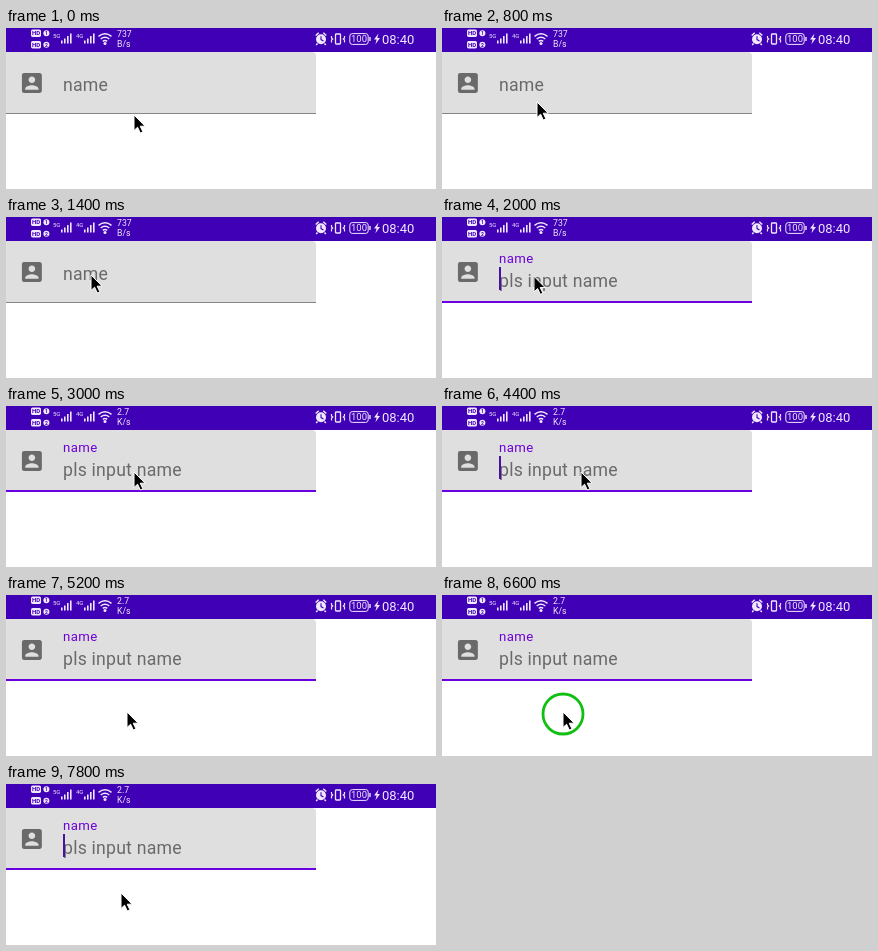
Write an HTML page that moves like this. It is 430 px wide and 161 px high and loops after 8 s.

```html
<!DOCTYPE html>
<html lang="en">
<head>
<meta charset="utf-8">
<title>Text field</title>
<style>
html, body { margin: 0; width: 100%; height: 100%; overflow: hidden; background: #fff; }
svg { display: block; width: 430px; height: 161px; font-family: Roboto, "Noto Sans", sans-serif; }
.bar { fill: #f0e8fc; }
.line { fill: none; stroke: #f0e8fc; }
</style>
</head>
<body>
<svg viewBox="0 0 430 161">
  <defs>
    <g id="sim">
      <path d="M9 12.5h1.6v3H9zM12 10.5h1.6v5H12zM15 8h1.6v7.5H15zM18 5.5h1.6v10H18z"/>
    </g>
    <g id="hd">
      <rect width="10" height="7.4" rx="1.6" class="bar"/>
      <text x="5" y="5.9" font-size="6" font-weight="700" text-anchor="middle" fill="#4000b6">HD</text>
      <circle cx="15.4" cy="3.7" r="3" class="bar"/>
    </g>
  </defs>

  <rect width="430" height="24" fill="#4000b6"/>
  <g font-size="5" font-weight="700" fill="#4000b6" text-anchor="middle">
    <use href="#hd" x="25" y="1.5"/><text x="40.4" y="7">1</text>
    <use href="#hd" x="25" y="13"/><text x="40.4" y="18.5">2</text>
  </g>
  <g class="bar">
    <use href="#sim" x="46"/><use href="#sim" x="69"/>
    <text x="47" y="10" font-size="6">5G</text><text x="70" y="10" font-size="6">4G</text>
    <circle cx="99" cy="15.4" r="1.5"/>
    <text id="speed" x="111" y="9" font-size="8.7"></text>
    <text id="unit" x="111" y="19" font-size="8.7"></text>
    <text x="353" y="14.4" font-size="9.5" text-anchor="middle">100</text>
    <path d="M372.5 5.5l-4.5 6h2.6l-1.2 4.8 4.6-6.3h-2.7z"/>
    <text x="376" y="15.7" font-size="13">08:40</text>
    <circle cx="315" cy="11.3" r="5"/>
  </g>
  <g class="line" stroke-width="1.5">
    <path d="M92.5 8.3q6.5-5 13 0M94.7 11q4.3-3.3 8.6 0M96.8 13.4q2.2-1.6 4.4 0"/>
    <path d="M309.7 7.5l3-2.7M320.3 7.5l-3-2.7M311.5 15.5l-1.3 1.5M318.5 15.5l1.3 1.5"/>
    <path d="M315 8.3v3.3l2.5 1.3" stroke="#4000b6" stroke-width="1.1"/>
    <rect x="329.5" y="6" width="5" height="10" rx=".8" stroke-width="1.3"/>
    <path d="M325.5 8v2l1.2 1-1.2 1v2.5M338.5 8v2l-1.2 1 1.2 1v2.5" stroke-width="1.2"/>
    <rect x="343.8" y="5.6" width="18.4" height="10.8" rx="2.5" stroke-width="1"/>
    <path d="M364 9v4" stroke-width="1.4"/>
  </g>

  <path d="M0 24h306a4 4 0 0 1 4 4v58H0z" fill="#dfdfdf"/>
  <path transform="translate(12.6 41.8) scale(1.107)" fill="#6a6a6a" d="M3 5v14a2 2 0 0 0 2 2h14c1.1 0 2-.9 2-2V5c0-1.1-.9-2-2-2H5a2 2 0 0 0-2 2zm12 4c0 1.66-1.34 3-3 3s-3-1.34-3-3 1.34-3 3-3 3 1.34 3 3zm-9 8c0-2 4-3.1 6-3.1s6 1.1 6 3.1v1H6z"/>
  <rect id="under" width="310"/>
  <text id="label" x="57" letter-spacing=".2">name</text>
  <text id="hint" x="57" y="70" font-size="17.7" letter-spacing=".2" fill="#6a6a6a">pls input name</text>
  <rect id="caret" x="57" y="50" width="2" height="23" fill="#4a0fa8"/>

  <circle id="ring" r="20" fill="none" stroke="#10c010" stroke-width="2.8"/>
  <path id="mouse" d="M0 0v15.5l3.6-3.3 2.7 5.8 2.6-1.2-2.7-5.6h4.9z" fill="#000" stroke="#fff" stroke-width="1"/>
</svg>
<script>
const $ = id => document.getElementById(id);
const LOOP = 8000, STEP = 200, FOCUS = 1700;

// time, x, y of the pointer tip
const path = [
  [0, 128, 87], [200, 128, 101], [400, 123, 107], [600, 111, 95], [800, 95, 74],
  [1000, 85, 58], [1800, 85, 58], [2400, 106, 62], [3000, 128, 66], [3200, 138, 71],
  [3600, 153, 50], [3800, 158, 42], [4000, 159, 54], [4400, 139, 66], [4800, 127, 98],
  [5200, 121, 117], [7200, 121, 117], [7800, 115, 109], [LOOP, 115, 109]
];
const clicks = [[1000, 1400], [6600, 7000]];

const clamp = v => Math.max(0, Math.min(1, v));
const mix = (a, b, k) => a + (b - a) * k;
const blend = (a, b, k) => `rgb(${a.map((v, i) => Math.round(mix(v, b[i], k)))})`;
const show = (el, on) => el.setAttribute("opacity", +on);

function set(el, attrs) {
  for (const name in attrs) el.setAttribute(name, attrs[name]);
}

function pointer(t) {
  const i = path.findIndex(p => p[0] > t);
  const [t0, x0, y0] = path[i - 1], [t1, x1, y1] = path[i];
  const k = (t - t0) / (t1 - t0);
  return [mix(x0, x1, k), mix(y0, y1, k)];
}

function draw(t) {
  const k = clamp((t - FOCUS) / 300), ease = k * k * (3 - 2 * k);
  set($("label"), {
    y: mix(63, 46, ease),
    "font-size": mix(17.7, 13.2, ease),
    "letter-spacing": mix(.2, .4, ease),
    fill: blend([106, 106, 106], [108, 0, 216], k)
  });
  set($("under"), {
    y: mix(85, 84, k),
    height: mix(1, 2, k),
    fill: blend([133, 133, 133], [106, 0, 224], k)
  });
  show($("hint"), clamp((t - FOCUS - 166) / 134));
  show($("caret"), t >= FOCUS && (t - 1600) % 2000 < 1000);

  const early = t < 2200;
  $("speed").textContent = early ? "737" : "2.7";
  $("unit").textContent = early ? "B/s" : "K/s";

  const [x, y] = pointer(t);
  set($("mouse"), { transform: `translate(${x} ${y})` });
  set($("ring"), { cx: x, cy: y + 2 });
  show($("ring"), clicks.some(([a, b]) => t >= a && t < b));
}

function frame() {
  draw(Math.floor(performance.now() % LOOP / STEP) * STEP);
  requestAnimationFrame(frame);
}
frame();
</script>
</body>
</html>
```
